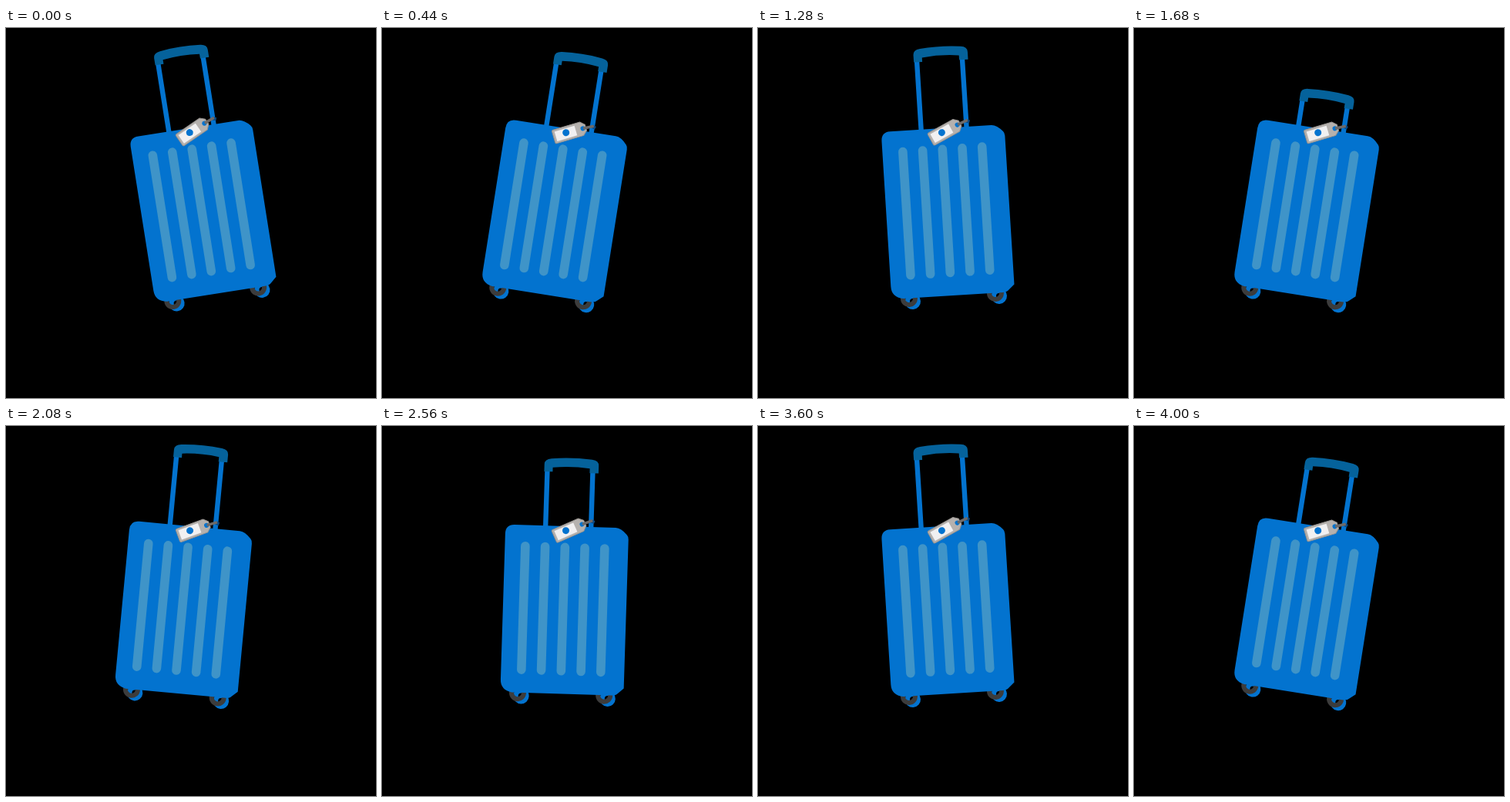
An HTML page that plays this animation: 480 by 480 pixels, repeating every 4040 ms.

```html
<!DOCTYPE html>
<html lang="en">
<head>
<meta charset="utf-8">
<title>Suitcase</title>
<style>
  html, body { margin: 0; height: 100%; overflow: hidden; background: #000; }
  svg { display: block; width: 100%; height: 100%; }
</style>
</head>
<body>
<svg viewBox="0 0 480 480">
  <defs>
    <g id="wheel" fill="none">
      <circle cx="4.6" cy="4" r="7" stroke="#0373cf" stroke-width="6.4"/>
      <circle r="8" stroke="#3c3c3c" stroke-width="6"/>
    </g>
  </defs>
  <g id="case">
    <g id="handle">
      <path d="M212 36V160M271 36V160" stroke="#0373cf" stroke-width="6.4"/>
      <path fill="#05629b" d="M208 42.5V33Q208 26.5 217 25.5Q243 22.5 270 25.5Q278.5 26.5 278.5 33V43H267V37Q243 34 219 37V42.5Z"/>
    </g>
    <use href="#wheel" x="182.6" y="348"/>
    <use href="#wheel" x="294.8" y="348"/>
    <path fill="#0373cf" d="M160 142Q160 130 172 130H303Q310 130 318 139Q320 141 320 145V338L311 346Q309 347.5 305 347.5H175Q160 345 160 331Z"/>
    <path id="ribs" stroke="#3f94c8" stroke-width="11.6" stroke-linecap="round"/>
    <g transform="translate(238 137) rotate(-25.5)">
      <path d="M36 4L39 1" stroke="#0a4a86" stroke-width="5"/>
      <path fill="#b5b1ae" stroke="#97938f" d="M-14 -9H22L27.5 -4V4L22 9H-14Q-16 9 -16 7V-7Q-16 -9 -14 -9Z"/>
      <rect x="-13" y="-6.5" width="27" height="13" fill="#f1f0f1"/>
      <circle cx="1" cy="-1" r="4.5" fill="#0373cf"/>
      <circle cx="23.5" r="3" fill="#0373cf"/>
      <path d="M24 0L38 1" stroke="#6d6a69" stroke-width="3.6"/>
    </g>
  </g>
</svg>
<script>
  const STEP = 40, STEPS = 101;
  const el = id => document.getElementById(id);

  el('ribs').setAttribute('d',
    [-2, -1, 0, 1, 2].map(k => `M${238 + k * 25.75} 157.4V317.8`).join(''));

  // Tilts over ten steps, rests, then snaps back every 14.4 steps.
  const tilt = i => -9 + 1.8 * Math.min(10, Math.floor(i * 5 % 72 / 5));

  // Slides down and up over 12 steps, then rests for six.
  function slide(i) {
    const k = Math.max(0, 1 - Math.abs(i % 18 - 6) / 6);
    const eased = k * k * (3 - 2 * k);
    return 56 * (2 * k + eased) / 3;
  }

  function draw() {
    const i = Math.floor(performance.now() / STEP) % STEPS;
    el('case').setAttribute('transform', `rotate(${tilt(i)} 238 137)`);
    el('handle').setAttribute('transform', `translate(0 ${slide(i)})`);
    requestAnimationFrame(draw);
  }
  draw();
</script>
</body>
</html>
```
